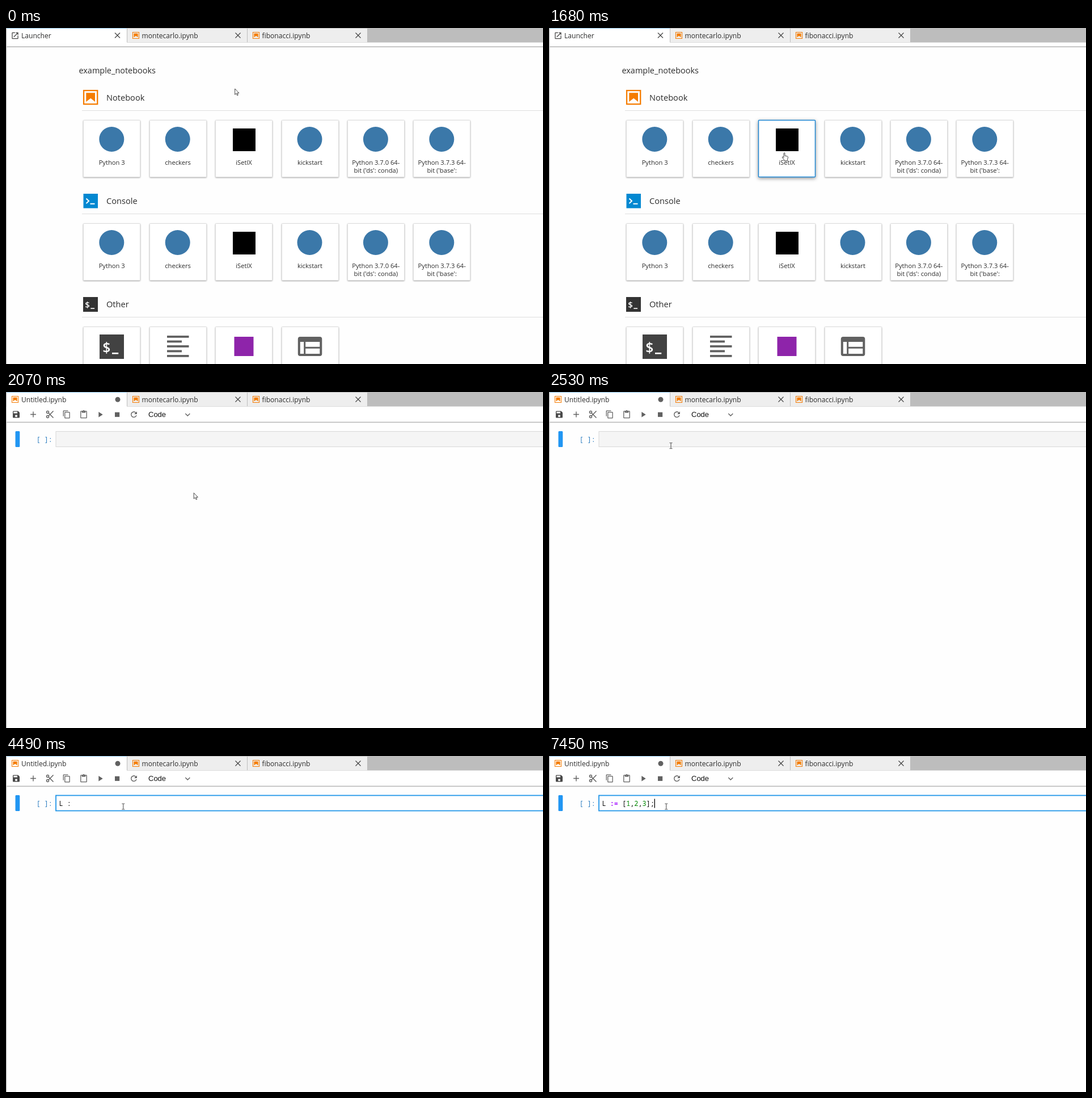
An HTML page that plays this animation: 947 px wide and 592 px high, repeating every 7.99 s.

```html
<!DOCTYPE html>
<html lang="en">
<head>
<meta charset="utf-8">
<title>Notebook launcher</title>
<style>
  html, body { margin: 0; width: 100%; height: 100%; overflow: hidden; background: #fefefe; }
  svg { display: block; }
  text { font-family: "Open Sans", "Noto Sans", sans-serif; fill: #2c2c2c; white-space: pre; }
  .tab { font-size: 12.1px; }
  .path { font-size: 14.45px; }
  .head { font-size: 14.6px; }
  .label { font-size: 11.2px; text-anchor: middle; }
  .code { font-family: "Noto Sans Mono", "DejaVu Sans Mono", monospace; font-size: 11.83px; fill: #111; }
  .prompt { fill: #307fc1; }
  .op { fill: #a2f; font-weight: bold; }
  .num { fill: #080; }
  .match { fill: #0b0; }
  .card { fill: #fff; stroke: #dcdcdc; filter: drop-shadow(0 1.6px 1.2px rgba(0,0,0,.33)); }
  .card.hover { stroke: #1c86d4; stroke-width: 1.5; filter: drop-shadow(0 2.5px 3px rgba(0,0,0,.42)); }
  .editor { fill: #f5f5f5; stroke: #d8d8d8; }
  .editor.active { fill: #fff; stroke: #2196e8; stroke-width: 1.8; }
</style>
</head>
<body>
<svg id="stage" width="947" height="592" viewBox="0 0 947 592"></svg>
<script>
const LOOP = 7990, STEP = 77.2, FIRST_MOVE = 680;
const OPENED = 1750, CLICKED = 2610;
const ORANGE = '#f57c00', GREY = '#616161';

const rect = (x, y, w, h, fill, more = '') =>
  `<rect x="${x}" y="${y}" width="${w}" height="${h}" fill="${fill}" ${more}/>`;
const text = (x, y, cls, s) => `<text x="${x}" y="${y}" class="${cls}">${s}</text>`;
const line = (d, color, width) =>
  `<path d="${d}" fill="none" stroke="${color}" stroke-width="${width}"/>`;
const at = (x, y, scale, body) => `<g transform="translate(${x} ${y}) scale(${scale})">${body}</g>`;

// Icons on a 24 unit grid, placed by their centre
const icon = (x, y, scale, d, fill = GREY) =>
  at(x, y, scale, `<path transform="translate(-12 -12)" fill="${fill}" d="${d}"/>`);

const bookmark = (x, y, size) => at(x, y, size / 18.4,
  line('M.75.75h16.9v16.9H.75z', ORANGE, 1.6) +
  `<path d="M3.7 3.7h11v11l-5.4-4.3-5.6 4.3z" fill="${ORANGE}"/>`);

const terminal = (x, y, size, fill) => at(x, y, size / 26,
  rect(0, 0, 26, 26, fill) +
  '<text x="3.2" y="19.2" style="font-size:15px;font-weight:600;fill:#fff">$</text>' +
  rect(13.3, 19.3, 6.8, 1.6, '#fff'));

const cross = x => line(`M${x - 4.5} 8.5l9 9m0-9l-9 9`, '#444', 1.2);

function tabBar() {
  const tab = (x, w, name) =>
    rect(x, 1, w, 24, '#eee') + bookmark(x + 9, 7, 12) +
    text(x + 25.5, 18, 'tab', name) + cross(x + 195);
  return rect(0, 0, 947, 25.5, '#bdbdbd') +
    tab(214, 211, 'montecarlo.ipynb') + tab(426, 211, 'fibonacci.ipynb') +
    rect(1, 0, 212, 27, '#fff') + rect(1, 0, 212, 1, '#8cc4ea') +
    rect(0, 0, 1.3, 592, '#bdbdbd');
}

const kernels = [['Python 3'], ['checkers'], ['iSetlX'], ['kickstart'],
  ['Python 3.7.0 64-', "bit ('ds': conda)"], ['Python 3.7.3 64-', "bit ('base':"]];

const cardX = i => Math.floor(136.8 + 116.4 * i) + .5;
const card = (i, y, id = '') =>
  `<rect class="card" ${id} x="${cardX(i)}" y="${y}" width="100" height="100" rx="1"/>`;

function kernelRow(top) {
  return kernels.map((lines, i) => {
    const cx = 187 + 116.4 * i;
    const mark = i === 2
      ? rect(400, top + 14.5, 40, 40, '#000')
      : `<circle cx="${cx - .7}" cy="${top + 33.5}" r="22" fill="#3b78a9"/>`;
    return card(i, top, i === 2 && top < 200 ? 'id="target"' : '') + mark +
      lines.map((s, k) => text(cx - .3, top + 78.3 + 14 * k, 'label', s)).join('');
  }).join('');
}

function launcher() {
  const section = (y, name) =>
    text(177, y + 5, 'head', name) + rect(134, y + 22, 813, 1, '#dedede');
  let rows = '';
  for (let k = 0; k < 5; k++) rows += rect(284, 542 + 8.5 * k, k % 2 ? 26 : 38.5, 3.8, GREY);
  return rect(1.3, 32.3, 946, 1.7, '#bdbdbd') +
    icon(16, 13.5, .63, 'M19 19H5V5h7V3H5c-1.11 0-2 .9-2 2v14c0 1.1.89 2 2 2h14c1.1 0 2-.9 2-2v-7h-2v7zM14 3v2h3.59l-9.83 9.83 1.41 1.41L19 6.41V10h2V3h-7z', '#444') +
    text(27, 18, 'tab', 'Launcher') + cross(196.5) +
    text(128.5, 80, 'path', 'example_notebooks') +
    bookmark(136, 109, 26.3) + section(123, 'Notebook') + kernelRow(162.5) +
    rect(136.5, 292, 25.5, 25.5, '#0288d1') +
    line('M141.5 300.5l4.5 4.3-4.5 4.3M148.5 309.8h8', '#fff', 2) +
    section(305, 'Console') + kernelRow(344.5) +
    terminal(136, 474, 26, '#333') + section(487, 'Other') +
    [0, 1, 2, 3].map(i => card(i, 526.5)).join('') +
    terminal(165, 540, 43, '#424242') + rows +
    rect(402.5, 544, 34, 34, '#8e24aa') +
    `<rect x="516.8" y="546" width="38.5" height="30" rx="2" fill="none" stroke="${GREY}" stroke-width="4"/>` +
    rect(516, 546, 40, 7, GREY) +
    line('M526.7 553v23M527 563.3h28', GREY, 3);
}

function notebook() {
  return rect(1.3, 26, 946, 27, '#fff') + rect(1.3, 52.5, 946, 1.7, '#bdbdbd') +
    bookmark(10, 7, 12) + text(27, 18, 'tab', 'Untitled.ipynb') +
    `<circle cx="197" cy="13.2" r="4.5" fill="${GREY}"/>` +
    icon(18, 39.5, .67, 'M17 3H5c-1.11 0-2 .9-2 2v14c0 1.1.89 2 2 2h14c1.1 0 2-.9 2-2V7l-4-4zm-5 16c-1.66 0-3-1.34-3-3s1.34-3 3-3 3 1.34 3 3-1.34 3-3 3zm3-10H5V5h10v4z', '#4a4a4a') +
    icon(48, 39.5, .7, 'M19 13h-6v6h-2v-6H5v-2h6V5h2v6h6v2z') +
    at(69.5, 31.5, .667,
      `<g fill="none" stroke="${GREY}" stroke-width="2.2"><circle cx="6" cy="6" r="3"/><circle cx="6" cy="18" r="3"/>` +
      '<path d="M8 8l13 13M8 16L21 3"/></g>') +
    icon(107, 39.5, .64, 'M16 1H4c-1.1 0-2 .9-2 2v14h2V3h12V1zm3 4H8c-1.1 0-2 .9-2 2v14c0 1.1.9 2 2 2h11c1.1 0 2-.9 2-2V7c0-1.1-.9-2-2-2zm0 16H8V7h11v14z') +
    icon(137, 39.7, .65, 'M19 2h-4.18C14.4.84 13.3 0 12 0c-1.3 0-2.4.84-2.82 2H5c-1.1 0-2 .9-2 2v16c0 1.1.9 2 2 2h14c1.1 0 2-.9 2-2V4c0-1.1-.9-2-2-2zm-7 0c.55 0 1 .45 1 1s-.45 1-1 1-1-.45-1-1 .45-1 1-1zm7 18H5V4h2v3h10V4h2v16z') +
    icon(166, 39.7, .67, 'M8 5v14l11-7z') +
    rect(192, 35.7, 8.2, 8.2, GREY) +
    icon(225.5, 39.7, .67, 'M17.65 6.35C16.2 4.9 14.21 4 12 4c-4.42 0-7.99 3.58-7.99 8s3.57 8 7.99 8c3.73 0 6.84-2.55 7.73-6h-2.08c-.82 2.33-3.04 4-5.65 4-3.31 0-6-2.69-6-6s2.69-6 6-6c1.66 0 3.14.69 4.22 1.78L13 11h7V4l-2.35 2.35z') +
    '<text x="251" y="43.5" style="font:13px Liberation Sans,Arial,sans-serif;fill:#111">Code</text>' +
    line('M316.3 38l4 4 4-4', GREY, 1.4) +
    rect(16.5, 69, 7.8, 28, '#2196f3', 'rx="1.5"') +
    text(53.5, 88, 'code prompt', '[ ]:') +
    '<rect id="editor" class="editor" x="88" y="69.5" width="870" height="27"/>' +
    '<text id="code" class="code" x="93.5" y="88"></text>' +
    '<rect id="caret" y="75.5" width="1.3" height="16" fill="#000"/>';
}

const pointers = `
  <path id="arrow" d="M0 0V10.3L2.4 8.2 4 11.8 5.6 11.1 4.1 7.6H7.2Z" fill="#fff" stroke="#333" stroke-width=".9"/>
  <path id="hand" d="M-1 1Q0-.6 1 1V5.6L5.5 6.6Q6.6 7 6.5 8.3L5.6 12V14.3H-.6V12.4L-3.6 8.6Q-3.7 7-2.3 7.5L-1 8.8Z" fill="#fff" stroke="#333" stroke-width=".9"/>
  <path id="beam" d="M-2.4-5H-.6L0-4.5.6-5H2.4M0-4.5V4.5M-2.4 5H-.6L0 4.5.6 5H2.4" fill="none" stroke="#444"/>`;

const stage = document.getElementById('stage');
stage.innerHTML = tabBar() + `<g id="launcher">${launcher()}</g><g id="notebook">${notebook()}</g>` + pointers;
const $ = id => document.getElementById(id);
const show = (id, on) => $(id).setAttribute('display', on ? 'inline' : 'none');

// time, x, y of the pointer hot spot
const path = [[603, 403.7, 107], [990, 411, 182], [1220, 415, 219.5], [1830, 415, 219.5],
  [2069, 331.5, 178], [2225, 252, 116], [2400, 217, 96], [2687, 206.8, 89]];

// time, code, caret column, brackets matched
const typing = [[CLICKED, '', 0], [3530, 'L', 1], [3800, 'L ', 2], [3930, 'L :', 3], [4560, 'L :=', 4],
  [5040, 'L := ', 5], [5440, 'L := []', 6, 1], [5840, 'L := [1]', 7, 1], [5920, 'L := [1,]', 8, 1],
  [6070, 'L := [1,2]', 9, 1], [6150, 'L := [1,2,]', 10, 1], [6470, 'L := [1,2,3]', 11, 1],
  [6780, 'L := [1,2,3]', 12, 1], [7450, 'L := [1,2,3];', 13]];
// time the caret blinks off, by column
const BLINK = { 0: 3150, 3: 4490, 12: 7280 };

function pointerAt(t) {
  const q = FIRST_MOVE + STEP * Math.floor((t - FIRST_MOVE) / STEP + .02);
  let k = 0;
  while (k < path.length - 2 && q >= path[k + 1][0]) k++;
  const [t0, x0, y0] = path[k], [t1, x1, y1] = path[k + 1];
  const f = Math.min(1, Math.max(0, (q - t0) / (t1 - t0)));
  return [x0 + (x1 - x0) * f, y0 + (y1 - y0) * f];
}

const colour = (code, matched) => code.replace(/:=|\d|[[\]]/g, s => {
  const cls = s === ':=' ? 'op' : /\d/.test(s) ? 'num' : matched ? 'match' : '';
  return `<tspan class="${cls}">${s}</tspan>`;
});

let shown = null;
function draw(t) {
  const open = t >= OPENED;
  show('launcher', !open);
  show('notebook', open);

  const [x, y] = pointerAt(t);
  const hover = !open && y > 163;
  const kind = hover ? 'hand' : open && y < 97 ? 'beam' : 'arrow';
  for (const id of ['arrow', 'hand', 'beam']) show(id, id === kind);
  $(kind).setAttribute('transform', `translate(${x} ${y})`);
  $('target').classList.toggle('hover', hover);

  const state = typing.filter(s => s[0] <= t).pop();
  $('editor').classList.toggle('active', !!state);
  show('caret', state && !(t >= BLINK[state[2]]));
  if (state) $('caret').setAttribute('x', 93.3 + 7.1 * state[2]);
  if (state !== shown) {
    $('code').innerHTML = state ? colour(state[1], state[3]) : '';
    shown = state;
  }
}

const start = performance.now();
function tick() {
  draw((performance.now() - start) % LOOP);
  requestAnimationFrame(tick);
}
tick();
</script>
</body>
</html>
```
